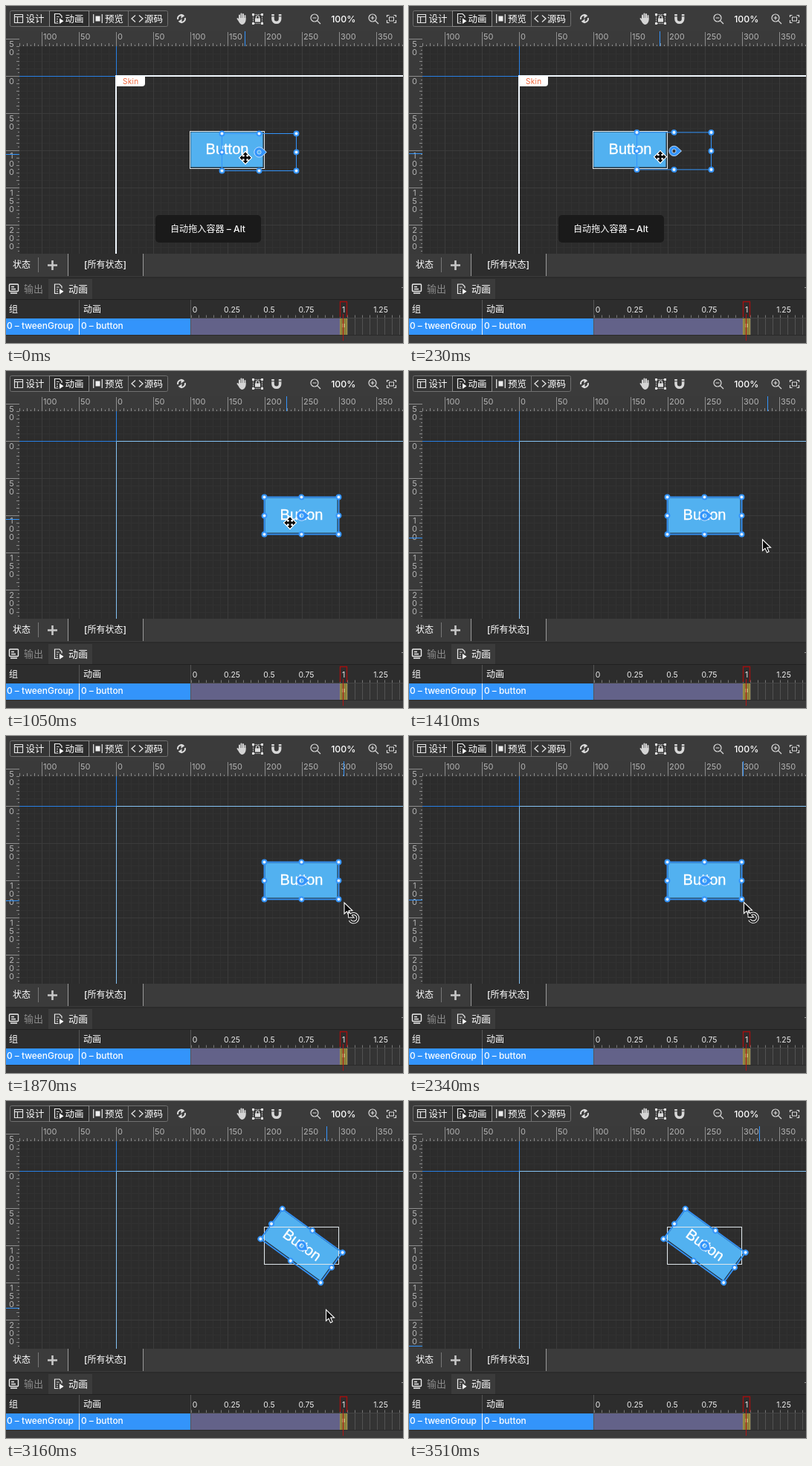
These frames come from a looping animation (534 px wide and 453 px high, 3860 ms). An HTML page:

```html
<!DOCTYPE html>
<html lang="zh">
<head>
<meta charset="utf-8">
<style>
html, body { margin: 0; width: 100%; height: 100%; overflow: hidden; background: #3b3b3b; }
svg { display: block; width: 100%; height: 100%; }
text { font-family: Inter, 'Noto Sans CJK SC', 'Noto Sans CJK', sans-serif; }
text.label { font-family: 'Liberation Sans', Arial, sans-serif; }
</style>
</head>
<body>
<svg id="stage" viewBox="0 0 534 453"></svg>
<script>
const BLUE = '#3394fb', FRAME = 350 / 3, LOOP = 3860;

const rect = (x, y, w, h, fill, more = '') =>
  `<rect x="${x}" y="${y}" width="${w}" height="${h}" fill="${fill}" ${more}/>`;
const path = (d, stroke, width = 1, fill = 'none', more = '') =>
  `<path d="${d}" stroke="${stroke}" stroke-width="${width}" fill="${fill}" ${more}/>`;
const text = (x, y, s, size = 12, fill = '#f4f4f4', more = '') =>
  `<text x="${x}" y="${y}" font-size="${size}" fill="${fill}" ${more}>${s}</text>`;
const dot = (x, y, r, stroke, width, fill = 'none') =>
  `<circle cx="${x}" cy="${y}" r="${r}" stroke="${stroke}" stroke-width="${width}" fill="${fill}"/>`;
const MID = 'text-anchor="middle"', BOLD = 'font-weight="500"', MID_BOLD = `${MID} ${BOLD}`;

// Joins a path piece for every value from a to b
function each(a, b, step, piece) {
  let out = '';
  for (let v = a; v <= b; v += step) out += piece(v);
  return out;
}

function canvas() {
  const lines = step =>
    each(148 - Math.floor(130 / step) * step, 534, step, x => `M${x + .5} 54V333`) +
    each(94 - Math.floor(40 / step) * step, 333, step, y => `M18 ${y + .5}H534`);
  return rect(18, 54, 516, 279, '#2c2c2c') +
    path(lines(10), '#313131') + path(lines(50), '#3b3b3b') +
    path('M18 94.5H148M148.5 54V94', '#2780e6') +
    path('M148.5 333V94.5H534', '#85c4f5') +
    `<g id="skin">` +
    path('M148 333V94H534', '#f2f9ff', 2) +
    path('M148 95H187V104Q187 108 183 108H148Z', 'none', 0, '#fff') +
    text(157, 105, 'Skin', 10, '#f0653a', 'letter-spacing=".3"') + `</g>`;
}

function rulers() {
  let out = rect(0, 34, 534, 20, '#3a3a3a') + rect(0, 34, 18, 299, '#3a3a3a') +
    path(each(18, 533, 5, x => `M${x + .5} 54V${x % 10 === 8 ? 50 : 52}`) +
      each(54, 332, 5, y => `M18 ${y + .5}H${y % 10 === 4 ? 14 : 16}`), '#8c8c8c') +
    path(each(48, 533, 50, x => `M${x + .5} 35V54`) +
      each(44, 332, 50, y => `M0 ${y + .5}H18`), '#8c8c8c');
  for (let v = -100; v <= 350; v += 50) out += text(150 + v, 45, Math.abs(v), 11, '#b4b4b4');
  for (let v = -50; v <= 200; v += 50)
    [...String(Math.abs(v))].forEach((c, i) => {
      out += text(7.5, 105 + v + i * 10.8, c, 11, '#b4b4b4', MID);
    });
  return out + path('', BLUE, 1, 'none', 'id="mark"');
}

const playDoc = (x, y) =>
  path(`M${x + 5} ${y + 12.5}H${x}V${y}H${x + 6.5}L${x + 9.5} ${y + 3}V${y + 5.5}`, '#eee', 1.2) +
  path(`M${x + 2.5} ${y + 4}H${x + 6}M${x + 2.5} ${y + 7}H${x + 4.5}M${x + 2.5} ${y + 10}H${x + 4.5}`, '#ddd') +
  path(`M${x + 6.5} ${y + 6}L${x + 12} ${y + 9.7}L${x + 6.5} ${y + 13.4}Z`, 'none', 0, '#fff');

function zoom(x, plus) {
  return dot(x, 16, 5, '#ddd', 1.2) +
    path(`M${x + 3.6} 19.6L${x + 8} 24M${x - 2.5} 16H${x + 2.5}` + (plus ? `M${x} 13.5V18.5` : ''), '#ddd', 1.2);
}

function toolbar() {
  let out = rect(0, 0, 534, 34, '#3b3b3b') +
    rect(5.5, 6.5, 212, 21, '#353535', 'stroke="#707070" rx="2"') +
    rect(58.5, 6.5, 53, 21, '#2b2b2b', 'stroke="#8a8a8a"') + path('M164.5 7V27', '#707070');
  ['设计', '动画', '预览', '源码'].forEach((s, i) => {
    out += text([26.5, 79.5, 133, 186][i], 21.5, s, 12.5, '#fff', BOLD);
  });
  return out +
    path('M11.5 11.5H22.5V22.5H11.5ZM11.5 14.5H22.5M15.5 14.5V22.5', '#e4e4e4', 1.2) +
    playDoc(65.5, 10.5) +
    path('M117.7 11V23M129.3 11V23', '#ddd', 1.3) + rect(120.5, 13.5, 6, 7, '#eee') +
    path('M174 12.5L169 17L174 21.5M179 12.5L184 17L179 21.5', '#e4e4e4', 1.3) +
    path('M231.2 18A4.8 4.8 0 0 1 239.5 13.8M240.8 16A4.8 4.8 0 0 1 232.5 20.2', '#ddd', 2) +
    path('M242.5 16.5H236L239.3 20ZM229.5 17.5H236L232.7 14Z', 'none', 0, '#ddd',
      'transform="rotate(-90 236 17)"') +
    path('M314 19V12.5M316.5 17V10.5M319 17V11M321.5 18V13M311.5 17L315 22', '#d4d4d4', 2, 'none', 'stroke-linecap="round"') +
    path('M313 16H322.5V20Q321 25 317 25Q314 24 313 20Z', 'none', 0, '#d4d4d4') +
    path('M332.5 11.5H344.5V23.5H332.5Z', '#bbb', 1, 'none', 'stroke-dasharray="2 1"') +
    each(332, 345, 12, x => rect(x - 1, 10, 3, 3, '#ddd') + rect(x - 1, 22, 3, 3, '#ddd')) +
    rect(335, 16.5, 7, 5, '#ddd') + path('M336.5 17V15A2 2 0 0 1 340.5 15V17', '#ddd', 1.2) +
    path('M359 11V17.5A4.8 4.8 0 0 0 368.6 17.5V11', '#d8d8d8', 3.6) +
    path('M357 13.8H361M366.6 13.8H370.6', '#3b3b3b', 1) +
    zoom(415, false) + text(453.8, 21.5, '100%', 12.3, '#fff', MID_BOLD) + zoom(493, true) +
    path('M512.5 15V12.5H515.5M521.5 12.5H524.5V15M524.5 19V22.5H521.5M515.5 22.5H512.5V19', '#ddd', 1.2) +
    rect(515.5, 15, 6, 5, 'none', 'stroke="#ddd"');
}

function panel() {
  let out = rect(0, 333, 534, 120, '#3b3b3b') +
    rect(83, 333, 102, 30, '#2d2d2d') + path('M83.5 333V363M184.5 333V363', '#999') +
    text(9, 352, '状态', 12, '#fff', BOLD) + path('M43.5 338V358', '#777') +
    path('M62.5 342V355M56 348.5H69', '#c8c8c8', 2.6) +
    text(133.5, 352, '[所有状态]', 12, '#fff', MID_BOLD) +
    rect(0, 364, 534, 2, '#2b2b2b') + rect(0, 366, 534, 28, '#303030') + rect(57, 367, 59, 27, '#3b3b3b') +
    rect(4.5, 374, 12, 9.5, 'none', 'stroke="#eee" stroke-width="1.4" rx="1"') +
    path('M7 377.5H11M7 380.5H13M6 386H15', '#eee', 1.4) +
    text(24, 384.5, '输出', 13, '#8c8c8c') +
    playDoc(65.5, 374) + text(84, 384.5, '动画', 13, '#fff', BOLD) +
    path('M532 378.5H534', '#999') +
    rect(0, 394, 534, 1, '#202020') + rect(0, 395, 534, 47, '#2d2d2d') +
    text(4, 412, '组', 12, '#fff', BOLD) + text(104, 412, '动画', 12, '#fff', BOLD) +
    rect(0, 420, 248, 22, BLUE) + path('M98.5 395V420M248.5 395V442', '#555') +
    path('M98.5 420V442', '#e8eef5') +
    text(1, 434, '0 – tweenGroup', 11.9, '#fff', BOLD) + text(101, 434, '0 – button', 11.9, '#fff', BOLD) +
    path(each(249, 534, 10, x => `M${x + .5} 415.5V419`), '#777') +
    rect(249, 419, 285, 1, '#444') +
    rect(249, 420, 200, 22, '#636289') + rect(449, 420, 10, 22, '#8c803b') +
    rect(459, 420, 75, 22, '#343434') +
    path(each(459, 534, 10, x => `M${x + .5} 420V442`), '#525252') +
    rect(452, 427, 4, 5, '#b8a966') + path('M449.5 420V442M458.5 420V442', '#a39447') +
    path('M449.5 418V397.5H458.5V418', '#a01010', 1.4) +
    rect(0, 442, 534, 11, '#3b3b3b') + path('M0 442.5H534', '#2a2a2a') +
    path('M453.5 414V450', '#b01212');
  for (let i = 0; i < 6; i++) out += text(254 + i * 50, 412, i / 4, 10.4, '#eee', MID);
  return out;
}

function button() {
  return `<g id="base">` + rect(-50.5, -25.5, 101, 51, '#1d1d1d') + `</g><g id="button">` +
    rect(-49.5, -24.5, 99, 49, '#24323d') + rect(-49, -24, 97, 47, '#52b1f0') +
    text(0, 5.5, 'Button', 20, '#fff', `class="label" stroke="#fff" stroke-width=".35" ${MID}`) + `</g>` +
    rect(-50, -25, 100, 50, 'none', 'id="outline" stroke="#dfe6ea"');
}

function selection() {
  let out = rect(-50, -25, 100, 50, 'none', `id="edge" stroke="${BLUE}"`);
  for (const x of [-50, 0, 50])
    for (const y of [-25, 0, 25])
      if (x || y) out += dot(x, y, 3, BLUE, 1.9, '#e4f1ff');
  return `<g id="select">${out}` +
    path('M10 0L4.5 5A6.7 6.7 0 1 1 4.5 -5ZM2.6 0A2.6 2.6 0 1 0 -2.6 0A2.6 2.6 0 1 0 2.6 0Z',
      '#cfe6ff', .9, BLUE, 'fill-rule="evenodd"') + `</g>`;
}

function cursors() {
  const arm = 'M0 -7.5L3.2 -4H1.2V-1.2H4V-3.2L7.5 0';
  const arms = [0, 90, 180, 270].map(a =>
    `<path d="${arm}L4 3.2V1.2H0V0H-1.2V-4H-3.2Z" transform="rotate(${a})"/>`).join('');
  const arrow = path('M.5 .5V15.5L4 12.3L6.5 18L9.1 16.8L6.7 11.3H11.5Z', '#fff', 1.1, '#0a0a0a');
  const turn = 'M9 17A5.8 5.8 0 1 1 8 24';
  const tip = 'M6.5 14V20H12.5Z';
  return `<g id="move"><g stroke="#fff" stroke-width="2.2">${arms}</g><g fill="#080808">${arms}</g></g>` +
    `<g id="arrow">${arrow}</g><g id="turn">${arrow}` +
    path(turn, '#fff', 3.8) + path(tip, '#fff', 1.8, '#fff') +
    path(turn, '#111', 1.8) + path(tip, 'none', 0, '#111') + `</g>`;
}

const stage = document.getElementById('stage');
stage.innerHTML = canvas() + button() + selection() +
  `<g id="tip">` + rect(201, 281, 142, 37, '#1a1a1a', 'rx="5"') +
  text(221, 304, '自动拖入容器 – Alt', 12.1, '#fff', BOLD) + `</g>` +
  rulers() + toolbar() + panel() + cursors();

const el = {};
stage.querySelectorAll('[id]').forEach(n => { el[n.id] = n; });
const show = (name, on) => el[name].setAttribute('visibility', on ? 'visible' : 'hidden');
const place = (name, [x, y], a = 0) =>
  el[name].setAttribute('transform', `translate(${x} ${y}) rotate(${a})`);

// step, pointer x, y, ruler mark x, y
const POINTER = [
  [0, 322, 204, 322, 200], [5, 362, 201, 361, 197], [7, 382, 204, 378, 200], [9, 382, 204, 378, 200],
  [10, 402, 212, 408, 211], [12, 475, 226, 483, 225], [13, 465, 229, 466, 228], [14, 456, 224, 456, 222],
  [18, 453, 223, 453, 221], [20, 450, 223, 450, 221], [22, 441, 232, 443, 230], [24, 423, 240, 427, 239],
  [26, 414, 250, 416, 249], [27, 430, 280, 432, 279], [28, 464, 315, 466, 314], [29, 480, 436, 472, 330],
  [30, 480, 436, 472, 330]
];
const SELECT = [[0, 340.5, 196.5], [5, 380.5, 192.5], [6, 391.5, 193.5], [7, 397.5, 194.5]];
const ANGLE = [[20, 0], [21, 3], [24, 22], [26, 36]];

function at(keys, k) {
  let i = keys.findIndex(key => key[0] >= k);
  if (i < 0) i = keys.length - 1;
  const b = keys[i], a = keys[Math.max(0, i - 1)];
  const p = b === a ? 1 : Math.min(1, (k - a[0]) / (b[0] - a[0]));
  return b.slice(1).map((v, j) => a[j + 1] + (v - a[j + 1]) * p);
}

function draw(t) {
  // the picture advances in steps on a 10 ms clock
  const k = Math.min(30, Math.floor((Math.floor(t / 10) * 10 + 9.99) / FRAME));
  const inside = k < 9, released = k >= 27;
  const home = inside ? [297.5, 193.5] : [397.5, 194.5];
  const [angle] = at(ANGLE, k);
  const [px, py, mx, my] = at(POINTER, k);

  show('skin', inside);
  show('tip', inside);
  show('base', !released);
  place('base', home);
  place('outline', home);
  place('button', home, released ? angle : 0);
  place('select', at(SELECT, k), angle);
  el.edge.setAttribute('stroke-width', !inside && (angle === 0 || released) ? 1.8 : 1);

  const kind = k <= 9 ? 'move' : k < 14 ? 'arrow' : k < 27 ? 'turn' : k < 30 ? 'arrow' : '';
  for (const name of ['move', 'arrow', 'turn']) {
    show(name, name === kind);
    place(name, [px, py]);
  }
  el.mark.setAttribute('d', `M${Math.round(mx) - .5} 34V54M0 ${Math.round(my) - .5}H18`);
}

const start = performance.now();
function tick() {
  draw((performance.now() - start) % LOOP);
  requestAnimationFrame(tick);
}
tick();
</script>
</body>
</html>
```
